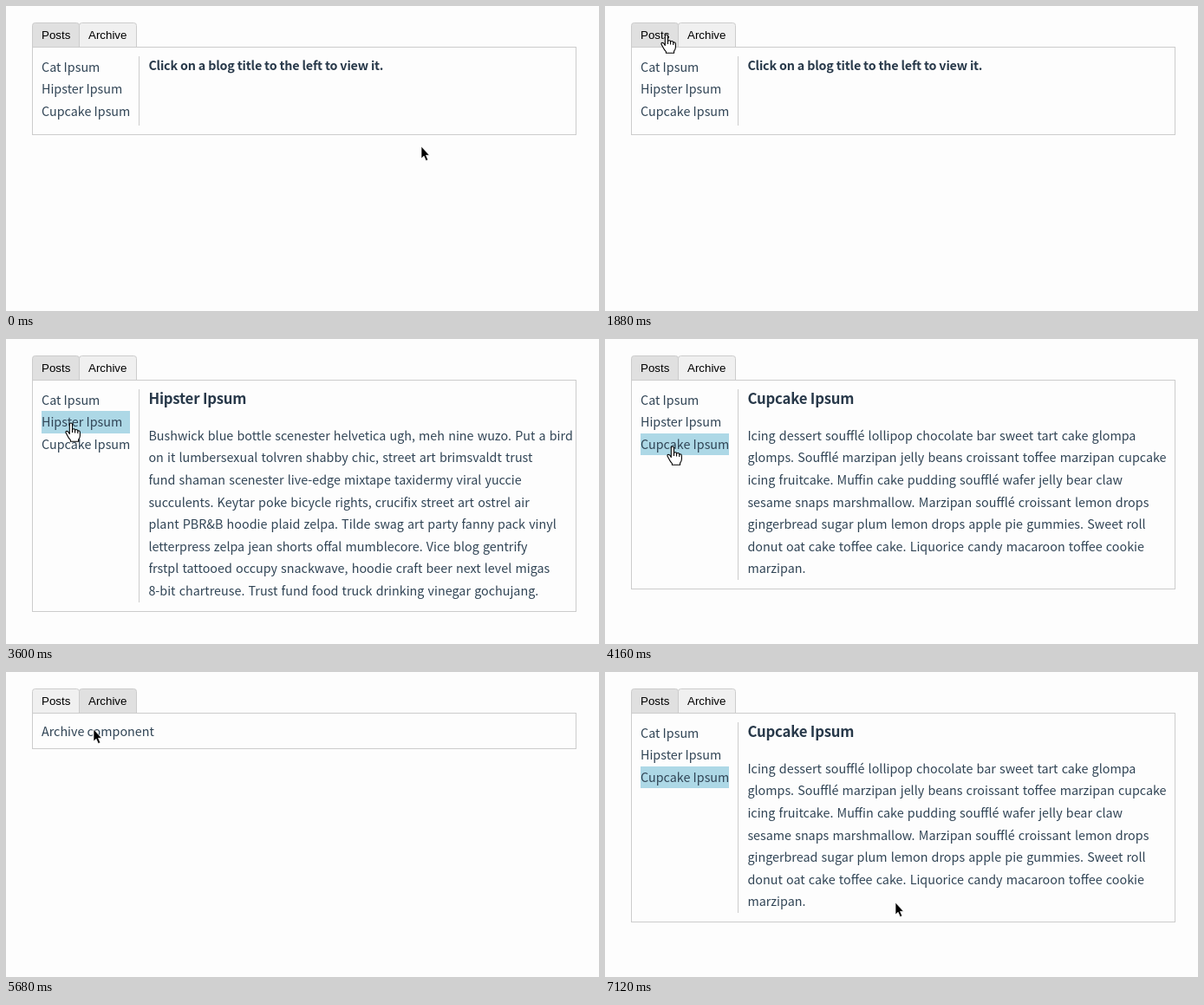
These frames come from a looping animation (684x352 px, 7.16 s). An HTML page:

```html
<!DOCTYPE html>
<html lang="en">
<head>
<meta charset="utf-8">
<title>Tabs with posts</title>
<style>
html, body { margin: 0; width: 100%; height: 100%; overflow: hidden; background: #fdfdfd; }
svg { display: block; }
text { font: 14.33px "Noto Sans CJK JP", "Noto Sans CJK SC", "Noto Sans CJK", sans-serif; fill: #304455; white-space: pre; }
text.body { word-spacing: 0.95px; }
text.strong { font-weight: 700; fill: #273849; letter-spacing: -0.19px; }
text.head { font-size: 16.77px; }
text.tab { font: 13.333px "Liberation Sans", Arial, sans-serif; fill: #000; }
.edge { fill: none; stroke: #ccc; }
</style>
</head>
<body>
<svg width="684" height="352" viewBox="0 0 684 352">
  <g id="view"></g>
  <g id="cursor">
    <path id="arrow" d="M0 0V14L3.1 11.2L5.4 16.6L7.8 15.6L5.5 10.3H9.4Z" fill="#000" stroke="#fff" stroke-width=".7"/>
    <g id="hand" fill="#fff" stroke="#000" stroke-width="1.1" stroke-linejoin="round">
      <path d="M-1.7 12.5V1.6Q-1.7 0 -.1 0T1.5 1.6V7.2Q4 6 4.6 8Q7.3 6.8 7.8 9Q10.4 8.3 10.4 11V14.5Q10.4 17 8.6 19.2V21.2H-.6V19.6Q-2.5 18 -3.6 15.5L-5.8 11.6Q-6.6 9.6 -4.8 9.3Q-3.4 9.3 -1.7 12.5Z"/>
      <path d="M1.5 7V11M4.6 8V11.5M7.8 9V12" fill="none"/>
    </g>
  </g>
</svg>
<script>
const LOOP = 7160;

const posts = [
  { title: "Cat Ipsum", bottom: 339, lines: [
    "Dont wait for the storm to pass, dance in the rain kick up litter decide",
    "to want nothing to do with my owner today demand to be let outside",
    "at once, and expect owner to wait for me as i think about it cat cat",
    "moo moo lick ears lick paws so make meme, make cute face but lick",
    "the other cats. Kitty poochy chase imaginary bugs, but stand in front of",
    "the computer screen. Sweet beast cat dog hate mouse eat string barf",
    "pillow no baths hate everything stare at guinea pigs. My left donut is",
    "missing, as is my right loved it, hated it, loved it, hated it scoot butt on",
    "the rug cat not kitten around"] },
  { title: "Hipster Ipsum", bottom: 314, lines: [
    "Bushwick blue bottle scenester helvetica ugh, meh nine wuzo. Put a bird",
    "on it lumbersexual tolvren shabby chic, street art brimsvaldt trust",
    "fund shaman scenester live-edge mixtape taxidermy viral yuccie",
    "succulents. Keytar poke bicycle rights, crucifix street art ostrel air",
    "plant PBR&amp;B hoodie plaid zelpa. Tilde swag art party fanny pack vinyl",
    "letterpress zelpa jean shorts offal mumblecore. Vice blog gentrify",
    "frstpl tattooed occupy snackwave, hoodie craft beer next level migas",
    "8-bit chartreuse. Trust fund food truck drinking vinegar gochujang."] },
  { title: "Cupcake Ipsum", bottom: 288, lines: [
    "Icing dessert soufflé lollipop chocolate bar sweet tart cake glompa",
    "glomps. Soufflé marzipan jelly beans croissant toffee marzipan cupcake",
    "icing fruitcake. Muffin cake pudding soufflé wafer jelly bear claw",
    "sesame snaps marshmallow. Marzipan soufflé croissant lemon drops",
    "gingerbread sugar plum lemon drops apple pie gummies. Sweet roll",
    "donut oat cake toffee cake. Liquorice candy macaroon toffee cookie",
    "marzipan."] }
];

const tabs = [
  { name: "Posts", x: 30, w: 55 },
  { name: "Archive", x: 84, w: 67 }
];

// Clicks: time, open tab, selected post
const clicks = [
  [0, 0, -1], [2600, 0, 0], [3320, 0, 1], [4040, 0, 2], [4760, 1, 2], [6080, 0, 2]
];

// Pointer moves: start, end, x, y
const moves = [
  [0, 0, 479, 162],
  [420, 1120, 140, 37],
  [1140, 1440, 69, 37],
  [1620, 1760, 58, 27],
  [1760, 1880, 71, 33],
  [2020, 2440, 72, 69],
  [2880, 3260, 75, 97],
  [3600, 3880, 78, 124],
  [4280, 4600, 108, 43],
  [4600, 4720, 110, 37],
  [5040, 5440, 101, 66],
  [5680, 6000, 58, 34],
  [6860, 7120, 335, 266]
];

const view = document.getElementById("view");
const cursor = document.getElementById("cursor");
const arrow = document.getElementById("arrow");
const hand = document.getElementById("hand");

const label = (x, y, s, cls = "") => `<text x="${x}" y="${y}" class="${cls}">${s}</text>`;
const box = (x, y, w, h, fill) => `<rect x="${x}" y="${y}" width="${w}" height="${h}" fill="${fill}"/>`;
const rowTop = i => Math.floor(58 + 25.6 * i);

function pointer(t) {
  let [, , x, y] = moves[0];
  for (const [a, b, nx, ny] of moves.slice(1)) {
    if (t <= a) break;
    const p = Math.min(1, (t - a) / (b - a));
    const e = p * p * (3 - 2 * p);
    x += (nx - x) * e;
    y += (ny - y) * e;
  }
  return [x, y];
}

function tabButton({ name, x, w }, lit) {
  const r = x + w - 0.5;
  return `<path class="edge" style="fill:${lit ? "#e0e0e0" : "#f0f0f0"}" d="M${x + 0.5} 47.5V22.5q0 -3 3 -3H${r - 3}q3 0 3 3V47.5Z"/>`
    + label(x + 11, 38, name, "tab");
}

function draw(tab, post, overTab, overRow) {
  const current = posts[post];
  const bottom = tab ? 88 : current ? current.bottom : 148;
  let out = "";
  // The open tab is painted over its neighbour
  for (const i of [1 - tab, tab]) out += tabButton(tabs[i], i === tab || i === overTab);
  out += `<rect class="edge" x="30.5" y="47.5" width="627" height="${bottom - 47}"/>`;
  if (tab) {
    out += label(41, 74, "Archive component");
  } else {
    out += box(153, 58, 1, bottom - 68, "#ccc");
    posts.forEach((p, i) => {
      const y = rowTop(i);
      const fill = i === post ? "#add8e6" : i === overRow ? "#eee" : "none";
      out += box(41, y, 102, rowTop(i + 1) - y, fill) + label(41, y + 18, p.title);
    });
    if (current) {
      out += label(164.4, 75, current.title, "strong head");
      current.lines.forEach((s, i) => out += label(164.4, Math.floor(117.3 + 25.6 * i), s, "body"));
    } else {
      out += label(164.4, 74, "Click on a blog title to the left to view it.", "strong");
    }
  }
  view.innerHTML = out;
}

let shown = "";
function frame(now) {
  const t = now % LOOP;
  const [x, y] = pointer(Math.floor(t / 40) * 40);
  const [, tab, post] = clicks.filter(c => c[0] <= t).pop();
  const overTab = y >= 19 && y < 47 ? tabs.findIndex(b => x >= b.x && x < b.x + b.w) : -1;
  const inList = !tab && x >= 41 && x < 143 && y >= 58 && y < 134;
  const overRow = inList ? Math.floor((y - 58) / 25.6) : -1;
  const key = [tab, post, overTab, overRow].join();
  if (key !== shown) {
    draw(tab, post, overTab, overRow);
    shown = key;
  }
  const pointing = overTab >= 0 || overRow >= 0;
  hand.style.display = pointing ? "" : "none";
  arrow.style.display = pointing ? "none" : "";
  cursor.setAttribute("transform", `translate(${Math.round(x)} ${Math.round(y)})`);
  requestAnimationFrame(frame);
}
requestAnimationFrame(frame);
</script>
</body>
</html>
```
